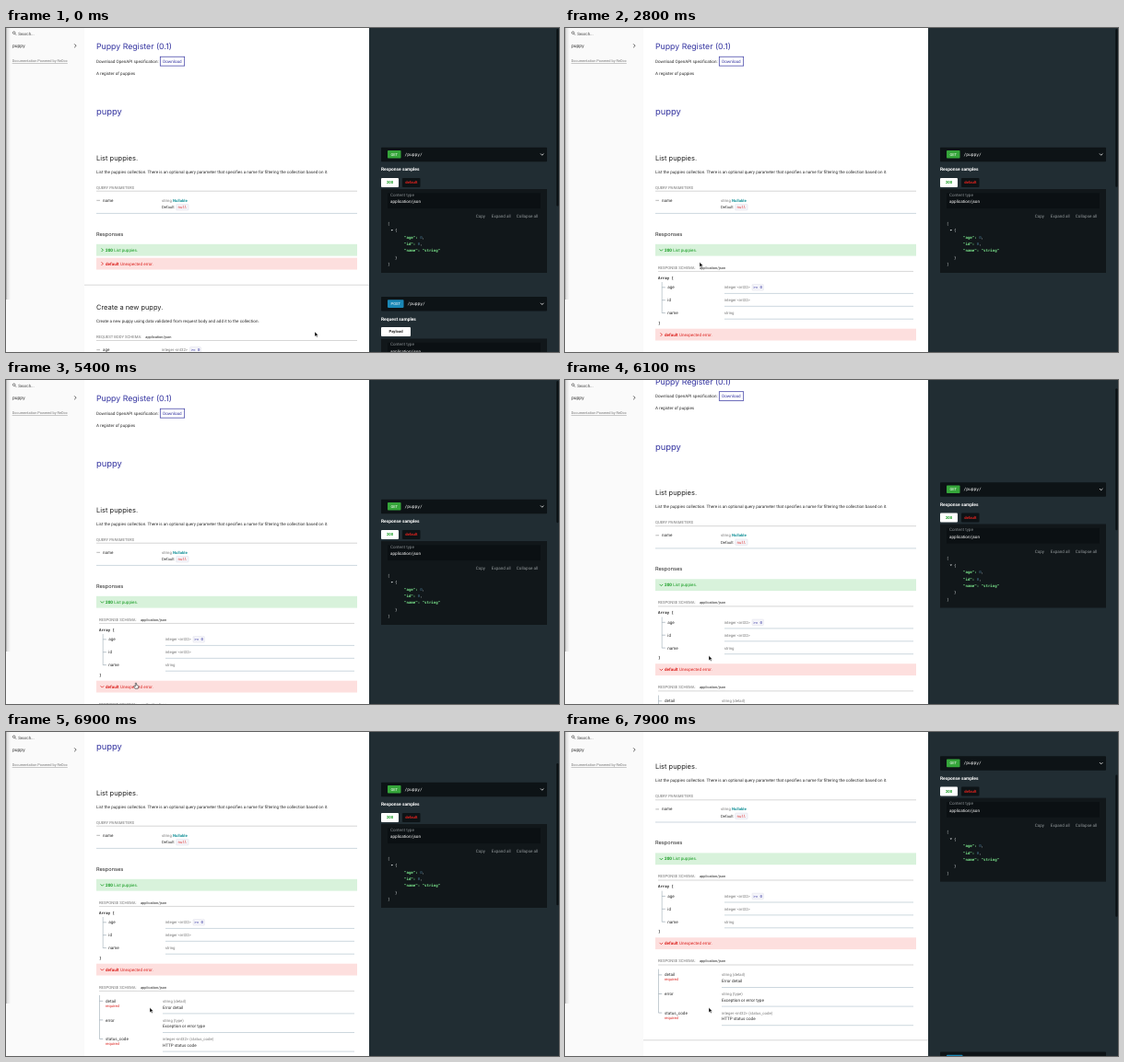
Recreate the animation shown at these times as an HTML page. Size 600 by 352 pixels, loop 8 s.

```html
<!DOCTYPE html>
<html lang="en">
<head>
<meta charset="utf-8">
<title>Puppy Register</title>
<style>
html, body { margin: 0; width: 100%; height: 100%; overflow: hidden; background: #fff; }
svg { display: block; width: 600px; height: 352px; }
text { font: 4.58px Roboto, sans-serif; text-rendering: geometricPrecision; white-space: pre; fill: #2b2b2b; }
.head { font-family: Inter, sans-serif; }
.mono { font-family: "DejaVu Sans Mono", monospace; }
.bold { font-weight: 700; }
</style>
</head>
<body>
<svg id="stage" viewBox="0 0 600 352"></svg>
<script>
const stage = document.getElementById('stage');
const NS = 'http://www.w3.org/2000/svg';
const BLUE = '#32329f', GREY = '#777', GREEN = '#129a1e', RED = '#dc2420', RULE = '#a9bcc8';
let target = stage;

function add(tag, attrs, content) {
  const el = document.createElementNS(NS, tag);
  for (const k in attrs) el.setAttribute(k, attrs[k]);
  if (content !== undefined) el.textContent = content;
  return target.appendChild(el);
}
function group(build) {
  const parent = target;
  const g = target = add('g', {});
  build();
  target = parent;
  return g;
}
function text(x, y, str, fill = '#2b2b2b', size = 4.58, cls = '') {
  return add('text', { x, y, class: cls, style: `font-size:${size}px;fill:${fill}` }, str);
}
const rect = (x, y, width, height, fill, more = {}) => add('rect', { x, y, width, height, fill, ...more });
const path = (d, stroke, w = .5, fill = 'none') => add('path', { d, stroke, 'stroke-width': w, fill });
const rule = (x1, x2, y, color = RULE, w = .6) => path(`M${x1} ${y}H${x2}`, color, w);
const small = (x, y, str) => text(x, y, str, GREY, 4.25);

function centred(x, y, str, fill, size, cls) {
  text(x, y, str, fill, size, cls).setAttribute('text-anchor', 'middle');
}
function badge(x, y, str, color, width) {
  rect(x, y - 4.8, width, 6.4, '#f5f5fa', { rx: .7, stroke: '#d9d9e6', 'stroke-width': .4 });
  centred(x + width / 2, y, str, color, 4.05, 'mono');
}
function schema(x, y, label, typeX, lineEnd) {
  text(x, y, label, GREY, 4.25);
  text(typeX, y, 'application/json', '#222', 3.92);
  rule(x, lineEnd, y + 2.7, '#bbb');
}
function response(y, code, label, color, bg) {
  rect(98, y, 283, 12.8, bg);
  text(108, y + 8, code, color, 4.58, 'bold');
  text(code === '200' ? 117.2 : 124, y + 8, label, color);
  return add('path', { fill: 'none', stroke: color, 'stroke-width': .8 });
}
function setArrow(el, y, open) {
  el.setAttribute('d', open ? `M102.6 ${y - .8}l1.8 1.8l1.8 -1.8` : `M103.6 ${y - 1.8}l1.8 1.8l-1.8 1.8`);
}

function operation(y, verb, color, width) {
  rect(407, y, 180, 15.5, '#0d1316', { rx: .8 });
  rect(414, y + 3.2, width, 8.7, color, { rx: .8 });
  centred(414 + width / 2, y + 9, verb, '#fff', 4.1);
  text(418 + width, y + 9.1, '/puppy/', '#fff', 4.55, 'mono');
  path(`M580 ${y + 6.8}l1.7 1.7l1.7 -1.7`, '#fff', .8);
}
function tab(x, y, width, label, color, bg) {
  rect(x, y, width, 10, bg, { rx: 1 });
  centred(x + width / 2, y + 6.4, label, color, 4.2, 'bold');
}
function sample(y, height) {
  rect(407, y, 180, height, '#11171a');
  rect(414, y + 4.3, 166, 16.8, '#0b1013');
  text(417, y + 7.8, 'Content type', '#8b9194');
  text(417, y + 15.2, 'application/json', '#fff');
}

// Page columns
rect(394, 0, 206, 352, '#212d33');
let box200, boxDefault, lower, post, arrow200, arrowDefault;

const page = group(() => {
  text(98, 23, 'Puppy Register (0.1)', BLUE, 8.74, 'head');
  text(98, 37.8, 'Download OpenAPI specification:');
  rect(167.3, 31.2, 26.4, 9.9, 'none', { stroke: BLUE, 'stroke-width': .7 });
  text(170.2, 37.8, 'Download', BLUE);
  text(98, 50.8, 'A register of puppies');
  text(98, 94, 'puppy', BLUE, 9.4, 'head');

  text(98, 143.7, 'List puppies.', '#222', 7.5, 'head');
  text(98, 157.9, 'List the puppies collection. There is an optional query parameter that specifies a name for filtering the collection based on it.');
  small(98, 174.5, 'QUERY PARAMETERS');
  rule(98, 381, 177.2, '#bbb');
  rule(98.3, 102, 187.3, '#888');
  text(105, 188.9, 'name');
  small(169, 188.9, 'string');
  text(181, 188.9, 'Nullable', '#179299', 4.25, 'bold');
  text(169, 196.3, 'Default', '#333', 4.25);
  badge(184.7, 196.3, 'null', RED, 13.4);
  rule(98, 381, 201.4);
  text(98, 225.6, 'Responses', '#222', 5.65, 'head');
  arrow200 = response(234.8, '200', 'List puppies.', GREEN, '#d8f2db');

  box200 = group(() => {
    schema(101, 261.7, 'RESPONSE SCHEMA:', 146, 378);
    text(101, 272.5, 'Array [', '#222', 4.05, 'mono bold');
    path('M105.2 276V309.7', '#8a9aa6');
    ['age', 'id', 'name'].forEach((name, i) => {
      const y = 283.4 + i * 13.9;
      rule(105.2, 108.8, y - 1.6, '#8a9aa6');
      text(111.3, y, name);
      small(172.7, y, name === 'name' ? 'string' : 'integer <int32>');
      rule(173, 378, y + 5);
    });
    badge(203, 283.4, '>= 0', BLUE, 12.4);
    text(101, 321.7, ']', '#222', 4.05, 'mono bold');
  });

  lower = group(() => {
    arrowDefault = response(249.7, 'default', 'Unexpected error.', RED, '#fddfde');
    setArrow(arrowDefault, 256, false);
    boxDefault = group(() => {
      schema(101, 276.7, 'RESPONSE SCHEMA:', 146, 378);
      path('M101.5 284V331.5', '#8a9aa6');
      [['detail', 'string (detail)', 'Error detail', 1],
       ['error', 'string (type)', 'Exception or error type', 0],
       ['status_code', 'integer <int32> (status_code)', 'HTTP status code', 1]
      ].forEach(([name, type, note, required], i) => {
        const y = 291.9 + i * 20.6;
        rule(101.5, 105.2, y - 1.6, '#8a9aa6');
        text(108, y, name);
        if (required) text(108, y + 5, 'required', RED, 4.1);
        small(170, y, type);
        text(170, y + 6.8, note);
        rule(170, 378, y + 12);
      });
    });
  });

  operation(129.7, 'GET', '#35a53a', 14.5);
  text(407, 155.4, 'Response samples', '#fff', 4.9, 'bold');
  tab(407, 163, 19, '200', GREEN, '#fff');
  tab(430, 163, 19.5, 'default', '#e0231f', '#0d1316');
  sample(175, 91);
  text(509.7, 206.4, 'Copy', '#92989a');
  text(526.8, 206.4, 'Expand all', '#92989a');
  text(553.8, 206.4, 'Collapse all', '#92989a');
  [[414, '['], [422, '{'], [432, '"age":', ' 0', ','], [432, '"id":', ' 0', ','],
   [432, '"name":', ' "string"'], [422, '}'], [414, ']']
  ].forEach(([x, key, value, comma], i) => {
    const y = 213.8 + i * 7.4, isKey = x === 432;
    text(x, y, key, isKey ? '#7be58c' : '#d5d9da', 4.07, isKey ? 'mono bold' : 'mono');
    if (value) text(x + key.length * 2.45, y, value, comma ? '#4a7893' : '#7be58c', 4.07, comma ? 'mono' : 'mono bold');
    if (comma) text(x + (key + value).length * 2.45, y, comma, '#d5d9da', 4.07, 'mono');
  });
  path('M417.6 218.9h2.4l-1.2 1.5z', 'none', 0, '#d5d9da');

  post = group(() => {
    rule(85, 394, 279.2, '#cfcfcf', .8);
    text(98, 306.3, 'Create a new puppy.', '#222', 7.43, 'head');
    text(98, 320.4, 'Create a new puppy using data validated from request body and add it to the collection.');
    schema(98, 336.8, 'REQUEST BODY SCHEMA:', 151.3, 381);
    rule(98.3, 102, 349.7, '#888');
    text(105, 351.4, 'age');
    small(169, 351.4, 'integer <int32>');
    badge(199.5, 351.4, '>= 0', BLUE, 12);
    operation(292, 'POST', '#1a87b5', 17.5);
    text(407, 317.9, 'Request samples', '#fff', 4.9, 'bold');
    tab(407, 325, 32, 'Payload', '#222', '#fff');
    sample(337.5, 91);
  });
});

// Fixed sidebar and scroll thumb
rect(0, 0, 85, 352, '#fafafa');
const fade = add('linearGradient', { id: 'fade' });
[[0, .45], [.25, .14], [1, 0]].forEach(([offset, alpha]) => {
  fade.append(add('stop', { offset, 'stop-color': '#333', 'stop-opacity': alpha }));
});
rect(0, 0, 5, 295, 'url(#fade)');
add('circle', { cx: 8.7, cy: 5.2, r: 1.3, fill: 'none', stroke: '#333', 'stroke-width': .6 });
path('M9.7 6.2l1.3 1.4', '#333', .7);
text(13.3, 7.6, 'Search...', '#444', 4.5);
text(7, 21.2, 'puppy', '#333', 5);
path('M74.2 17.4l1.9 1.9l-1.9 1.9', '#333', .8);
text(6.7, 37.2, 'Documentation Powered by ReDoc', '#777', 3.92).setAttribute('text-decoration', 'underline');
const thumb = rect(597.3, 1, 2.2, 150, '#0b1013', { rx: 1.1 });

const arrow = path('M0 0V5.2L1.3 4.1L2.2 6L3.1 5.6L2.2 3.8H3.8Z', '#fff', .4, '#000');
const hand = path('M-.7 -2.6Q0 -3.3 .6 -2.6V-.5L2.4 0Q3 .4 2.8 1.4L2.2 3.2H-.9L-2.5 .9Q-2.3 .1 -1.5 .5L-.7 1Z', '#222', .6, '#fff');

// Keyframes: [time, value, ...]
const scrollKeys = [[5900, 0], [6000, 6], [6100, 18.5], [6300, 41], [6500, 59], [6700, 75],
  [7000, 75], [7100, 84], [7200, 92.8], [7300, 98.5], [7400, 102], [7500, 103.4]];
const mouseKeys = [[0, 335, 330], [900, 270, 296], [1900, 146, 243], [2500, 146, 243], [2800, 146, 254.5],
  [3300, 148, 270], [4300, 141, 332], [5400, 141, 332], [5700, 156, 299.5]];
const OPEN_200 = 2400, OPEN_DEFAULT = 5000;

function at(keys, t, col = 1) {
  const i = keys.findIndex(k => k[0] > t);
  if (i < 0) return keys[keys.length - 1][col];
  if (i === 0) return keys[0][col];
  const a = keys[i - 1], b = keys[i];
  return a[col] + (b[col] - a[col]) * (t - a[0]) / (b[0] - a[0]);
}
const move = (el, x, y) => el.setAttribute('transform', `translate(${x} ${y})`);
const show = (el, on) => el.setAttribute('visibility', on ? 'visible' : 'hidden');

function draw(now) {
  const t = Math.floor(now % 8000 / 100) * 100;
  const first = t >= OPEN_200, second = t >= OPEN_DEFAULT;
  const scroll = at(scrollKeys, t), shift = first ? 77 : 0, grown = shift + (second ? 82 : 0);
  const x = at(mouseKeys, t, 1), y = at(mouseKeys, t, 2);

  move(page, 0, -scroll);
  move(lower, 0, shift);
  move(post, 0, grown);
  show(box200, first);
  show(boxDefault, second);
  setArrow(arrow200, 241.2, first);
  setArrow(arrowDefault, 256.1, second);

  const ratio = 352 / (640 + grown);
  thumb.setAttribute('y', 1 + scroll * ratio);
  thumb.setAttribute('height', 350 * ratio);

  const over = scroll === 0 && [241, 256 + shift].some(row => Math.abs(y - row) < 6.4);
  show(arrow, !over);
  show(hand, over);
  move(over ? hand : arrow, x, y);
  requestAnimationFrame(() => draw(performance.now()));
}
draw(0);
</script>
</body>
</html>
```
